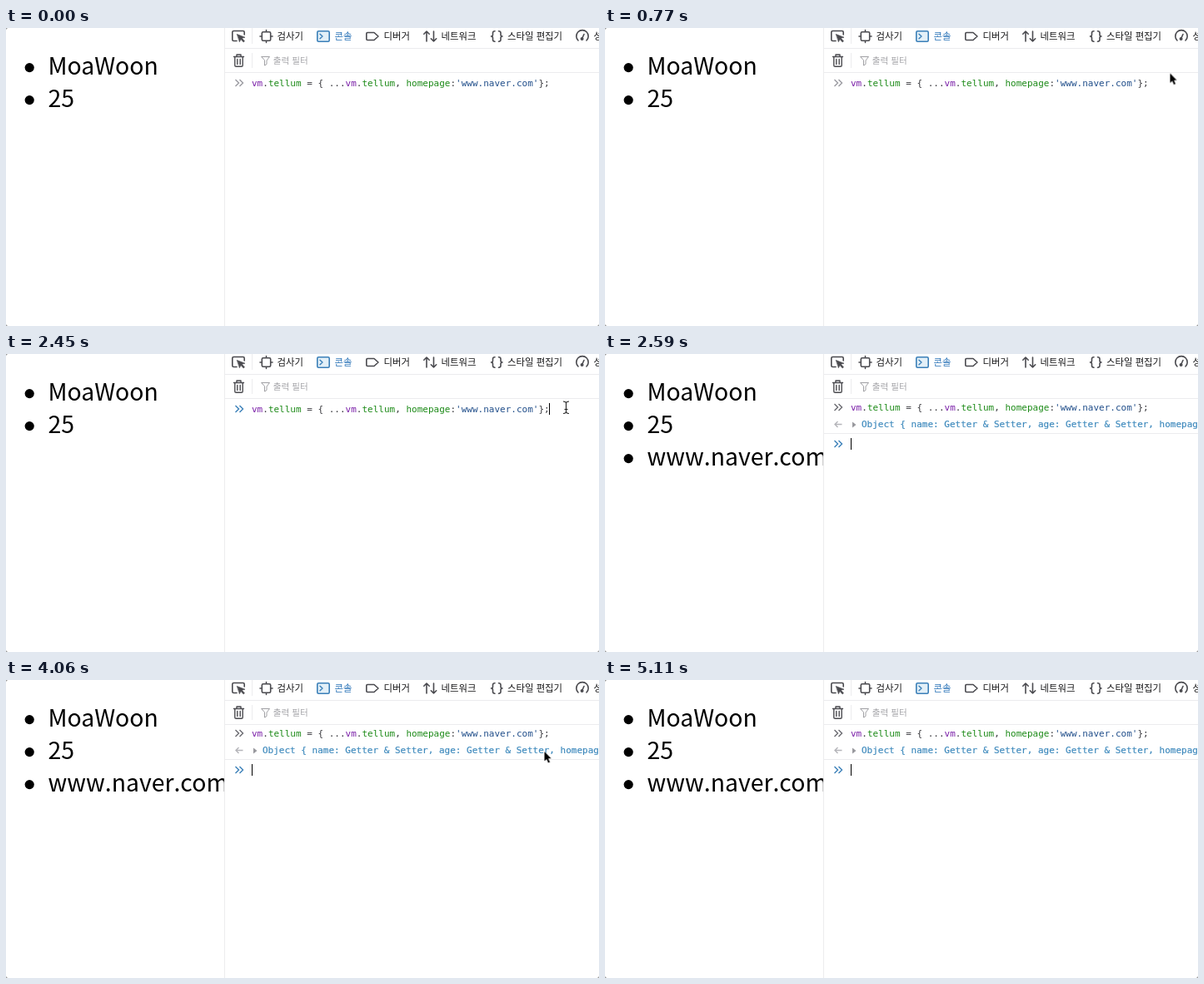
These frames come from a looping animation (712 px wide and 358 px high, 5180 ms). An HTML page:

```html
<!DOCTYPE html>
<html lang="ko">
<head>
<meta charset="utf-8">
<title>Console demo</title>
<style>
html, body { margin: 0; width: 100%; height: 100%; overflow: hidden; background: #fff; }
svg { display: block; width: 712px; height: 358px; }
text { white-space: pre; }
.list { font: 28.4px "Noto Sans CJK KR", "Noto Sans CJK", sans-serif; }
.tabs { font: 11.4px "Noto Sans CJK KR", "Noto Sans CJK", sans-serif; fill: #18181a; }
.tabs .active { fill: #2b74b8; }
.tabs .filter { font-size: 10.6px; fill: #a6a6aa; }
.mono { font: 11px "DejaVu Sans Mono", monospace; fill: #38383d; }
.result { fill: #3f8abd; stroke: #3f8abd; stroke-width: .2; }
.icon { fill: none; stroke: #4a4a4f; stroke-width: 1.6; stroke-linejoin: round; stroke-linecap: round; }
.rule { fill: none; stroke: #ececee; }
.chev { fill: none; stroke: #8b8b90; stroke-width: 1.4; }
.blue { stroke: #3a7fb8; }
.back { stroke: #b5b5ba; }
.caret { stroke: #000; stroke-width: 1; }
.vm { fill: #7a1fa8; } .prop { fill: #1c8a17; } .str { fill: #204e8a; }

.step { animation: 5180ms step-end infinite; }
.after { animation-name: after; }
.entry { animation-name: entry; }
.prompt { animation-name: prompt; }
.caret1 { animation-name: caret1; }
.caret2 { animation-name: caret2; }
.beam { animation-name: beam; }
.arrow { animation: arrow 5180ms linear infinite; }
.ring { animation: ring 5180ms linear infinite; }

@keyframes after { 0% { opacity: 0 } 48.5%, 100% { opacity: 1 } }
@keyframes entry { 0% { transform: none } 48.5%, 100% { transform: translateY(-2px) } }
@keyframes prompt {
  0% { stroke: #9a9aa0 } 22.8% { stroke: #3a7fb8 } 48.5%, 100% { stroke: #6a6a70 }
}
@keyframes caret1 {
  0% { opacity: 0 } 22.8% { opacity: 1 } 32.3% { opacity: 0 }
  43.1% { opacity: 1 } 48.5%, 100% { opacity: 0 }
}
@keyframes caret2 {
  0% { opacity: 0 } 48.5% { opacity: 1 } 59.4% { opacity: 0 }
  70.2% { opacity: 1 } 81.2% { opacity: 0 } 92.2%, 100% { opacity: 1 }
}
@keyframes beam { 0% { opacity: 0 } 16.2% { opacity: 1 } 48.5%, 100% { opacity: 0 } }
@keyframes ring {
  0%, 22.75% { opacity: 0; r: 14.5px }
  22.8%, 23.2% { opacity: 1; r: 14.5px }
  29.5%, 100% { opacity: 0; r: 21px }
}
@keyframes arrow {
  0%, 12.1% { opacity: 0; transform: translate(684px, 82px) }
  12.11% { opacity: 1; transform: translate(684px, 82px) }
  14.5%, 15% { opacity: 1; transform: translate(678.5px, 54.5px) }
  16.2% { opacity: 1; transform: translate(674px, 58px) }
  16.21%, 73% { opacity: 0; transform: translate(680px, 66px) }
  73.01% { opacity: 1; transform: translate(680px, 66px) }
  77%, 80.5% { opacity: 1; transform: translate(646.5px, 86px) }
  89.2% { opacity: 1; transform: translate(680px, 284px) }
  93.2%, 100% { opacity: 1; transform: translate(676px, 362px) }
}
</style>
</head>
<body>
<svg viewBox="0 0 712 358">
  <defs>
    <path id="chevron" d="M275.5 -4l4 4l-4 4M280.5 -4l4 4l-4 4"/>
    <clipPath id="page"><path d="M0 0H262V358H0z"/></clipPath>
  </defs>

  <g class="list" clip-path="url(#page)">
    <circle cx="28.2" cy="47.6" r="5.6"/><text x="50.5" y="56">MoaWoon</text>
    <circle cx="28.2" cy="86.6" r="5.6"/><text x="50.5" y="95">25</text>
    <g class="step after"><circle cx="28.2" cy="125.6" r="5.6"/><text x="50.5" y="134">www.naver.com</text></g>
  </g>

  <path class="rule" d="M262.5 0V358M263 24.5H712M263 53.5H712M295.5 0V19M295.5 30V48"/>

  <g class="icon">
    <path d="M277 15.5H273.5Q271.8 15.5 271.8 14V5Q271.8 3.5 273.5 3.5H284.5Q286.2 3.5 286.2 5V8"/>
    <path d="M277.5 7.5L287 11.2L283.3 12.3L286.5 15.8L285.2 17L282 13.6L280.5 16.5z" fill="#4a4a4f" stroke-width=".6"/>
    <rect x="307.3" y="4.8" width="10.4" height="10.4" rx="1.5"/>
    <path d="M312.5 2.5V4M312.5 16V17.5M305 10H306.5M318.5 10H320"/>
    <g class="blue"><rect x="373.8" y="3.8" width="14.4" height="12.4" rx="1.5" fill="#e3f0f8"/><path d="M377 7.2L380 10L377 12.8" stroke-width="1.4"/></g>
    <path d="M434 5.5H442L447 10L442 14.5H434Q432.8 14.5 432.8 13.3V6.7Q432.8 5.5 434 5.5z"/>
    <path d="M505 16V4M501.8 7.2L505 4L508.2 7.2M513.5 4V16M510.3 12.8L513.5 16L516.7 12.8"/>
    <path d="M587 3.8Q584.5 3.8 584.5 6V8Q584.5 10 582.5 10Q584.5 10 584.5 12V14Q584.5 16.2 587 16.2M591.5 3.8Q594 3.8 594 6V8Q594 10 596 10Q594 10 594 12V14Q594 16.2 591.5 16.2"/>
    <path d="M687 15A7.2 7.2 0 1 1 697 15M691.5 13L694 7.5"/><circle cx="691.6" cy="13" r="1.2"/>
    <path d="M273.5 34.5H285.5M277 34V32H282V34M274.8 35V45Q274.8 46.3 276.2 46.3H282.8Q284.2 46.3 284.2 45V35M277.8 37.5V43.5M281.2 37.5V43.5" stroke-width="1.4"/>
    <path d="M307 34.5H316.5L313 39V43.5L310.5 45V39z" stroke="#a0a0a4" stroke-width="1"/>
  </g>

  <g class="tabs">
    <text x="325.5" y="13.5">검사기</text>
    <text x="394.5" y="13.5" class="active">콘솔</text>
    <text x="453.5" y="13.5">디버거</text>
    <text x="522.5" y="13.5">네트워크</text>
    <text x="602" y="13.5">스타일 편집기</text>
    <text x="705.5" y="13.5">성능</text>
    <text x="320.7" y="42.8" class="filter">출력 필터</text>
  </g>

  <g class="step entry">
    <use href="#chevron" y="66" class="chev step prompt"/>
    <text class="mono" x="295" y="70"><tspan class="vm">vm</tspan>.<tspan class="prop">tellum</tspan> = { ...<tspan class="vm">vm</tspan>.<tspan class="prop">tellum</tspan>, <tspan class="prop">homepage</tspan>:<tspan class="str">'www.naver.com'</tspan>};</text>
  </g>
  <path class="caret step caret1" d="M652.5 59V73"/>

  <g class="step after">
    <path d="M284.5 84.5H276M279.5 81L276 84.5L279.5 88" class="chev back"/>
    <path d="M297 81.5L301.5 85L297 88.5z" fill="#98989d"/>
    <text class="mono result" x="308" y="88">Object { name: Getter &amp; Setter, age: Getter &amp; Setter, homepage: Getter</text>
    <path class="rule" d="M263 95.5H712"/>
    <use href="#chevron" y="108" class="chev blue"/>
  </g>
  <path class="caret step caret2" d="M295.5 101V115"/>

  <path class="step beam" d="M669 57Q672.5 57 672.5 59.5Q672.5 57 676 57M672.5 59V70M669 71.5Q672.5 71.5 672.5 69Q672.5 71.5 676 71.5M670.5 66.5H674.5" fill="none" stroke="#222" stroke-width="1.1"/>
  <circle class="ring" cx="672" cy="64" r="14.5" fill="none" stroke="#000" stroke-width="2.6"/>
  <path class="arrow" d="M0 0V11.4L2.6 9L4.6 13.6L6.5 12.7L4.6 8.3H8z" stroke="#fff" stroke-width="1" paint-order="stroke"/>

  <path d="M0 0H2L0 2zM0 358V356L2 358zM712 358H710L712 356z" fill="#999"/>
</svg>
</body>
</html>
```
